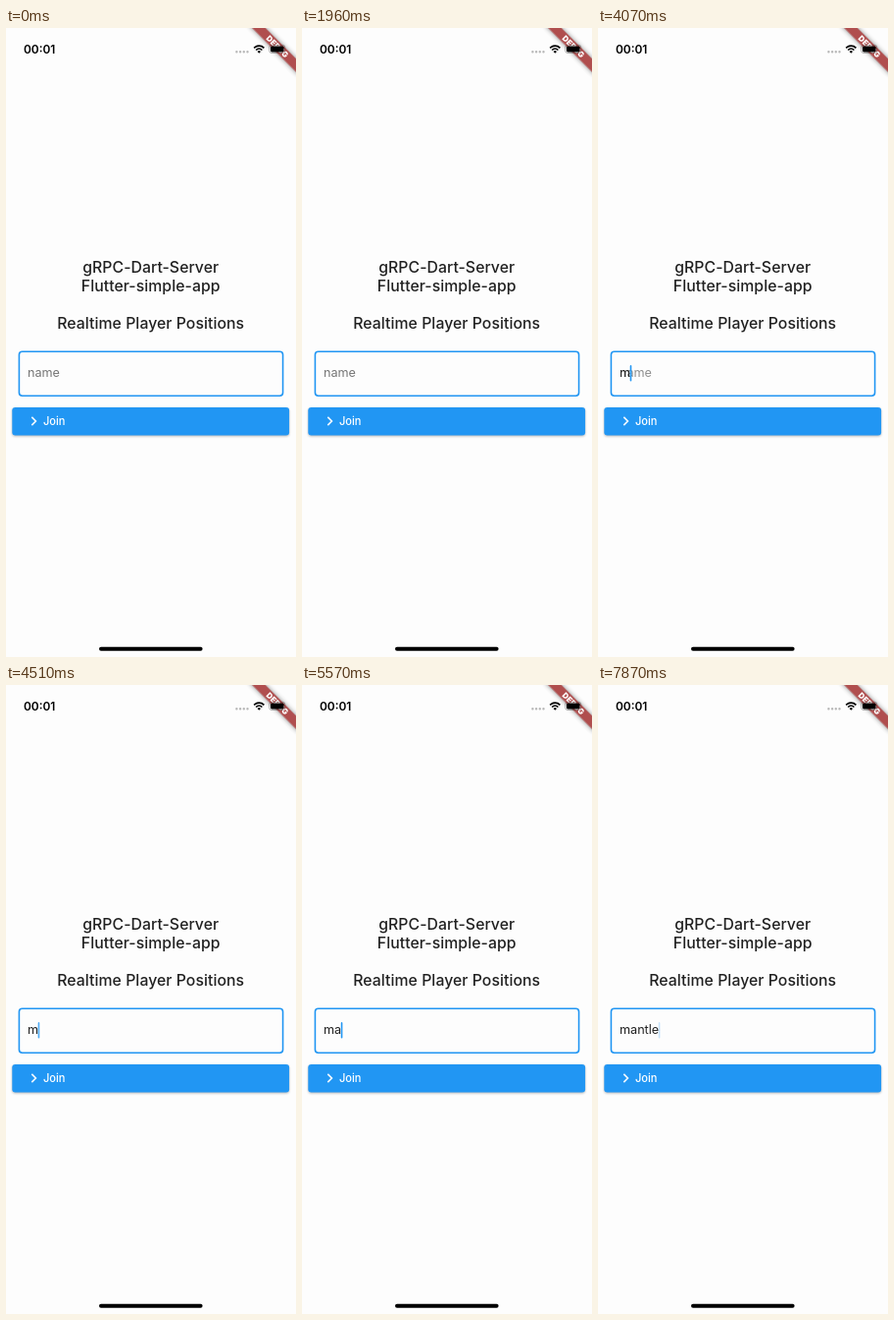
Recreate the animation shown at these times as an HTML page. Size 296 by 640 pixels, loop 7.99 s.

```html
<!DOCTYPE html>
<html lang="en">
<head>
<meta charset="utf-8">
<title>Realtime Player Positions</title>
<style>
  html, body { margin: 0; width: 100%; height: 100%; overflow: hidden; background: #fdfdfd; }
  svg { display: block; width: 100%; height: 100%; }
  text { font-family: Inter, Roboto, sans-serif; }
  .time { font-size: 11.9px; font-weight: 600; }
  .title { font-size: 15.8px; font-weight: 500; letter-spacing: .05px; text-anchor: middle; fill: #212121; }
  .field { font-size: 12.63px; fill: #212121; }
  #hint { fill: #757575; }
  .join { font-size: 11.05px; font-weight: 500; fill: #fff; }
  .debug { font-size: 8.06px; font-weight: 900; fill: #fff; text-anchor: middle; }
  .button { filter: drop-shadow(0 1.1px 1.1px #0004); }
  .ribbon { filter: drop-shadow(0 0 2.4px #0007); }
  .blue { fill: #2196f3; }
</style>
</head>
<body>
<svg viewBox="0 0 296 640">
  <!-- Debug ribbon -->
  <g transform="translate(296 0) rotate(45)">
    <rect class="ribbon" x="-36" y="22.1" width="72" height="9.5" fill="#b04e4e"/>
    <text class="debug" y="29.7">DEBUG</text>
  </g>

  <!-- Status bar -->
  <text class="time" x="18" y="25.7">00:01</text>
  <path d="M235.4 24.3h11.2" stroke="#b8b8b8" stroke-width="2.4" stroke-linecap="round" stroke-dasharray="0 3.7"/>
  <g fill="none" stroke="#000" stroke-width="1.7">
    <path d="M253.2 20.3a7.2 7.2 0 0 1 10.2 0"/>
    <path d="M255.2 22.5a4.4 4.4 0 0 1 6.2 0"/>
  </g>
  <path d="M256.6 23.9a2.4 2.4 0 0 1 3.4 0l-1.7 1.8z"/>
  <rect x="268.8" y="17.3" width="16" height="8.2" rx="2.3" fill="none" stroke="#000" stroke-opacity=".35" stroke-width=".8"/>
  <rect x="270" y="18.5" width="13.6" height="5.9" rx="1.3"/>

  <!-- Heading -->
  <g class="title">
    <text x="147.7" y="249">gRPC-Dart-Server</text>
    <text x="147.7" y="267.8">Flutter-simple-app</text>
    <text x="147.7" y="305.5">Realtime Player Positions</text>
  </g>

  <!-- Name field -->
  <rect x="13.4" y="329.2" width="269.2" height="45" rx="3.2" fill="none" stroke="#2196f3" stroke-width="1.6"/>
  <text id="hint" class="field" x="22" y="355.4">name</text>
  <text id="typed" class="field" x="22" y="355.4"></text>
  <rect id="caret" class="blue" y="343.1" width="1.6" height="16.4" rx=".8"/>

  <!-- Join button -->
  <rect class="button blue" x="6.3" y="386" width="282.8" height="28.4" rx="3.2"/>
  <path d="M26.3 395.9l4.1 4.1-4.1 4.1" fill="none" stroke="#fff" stroke-width="1.6"/>
  <text class="join" x="38" y="403.8">Join</text>

  <!-- Home indicator -->
  <rect x="95" y="629.8" width="105.6" height="4" rx="2"/>
</svg>
<script>
  const LOOP = 7990, NAME = 'mantle', LEFT = 22;
  const keyTimes = [4070, 5370, 5790, 6120, 6120, 6230];
  const FOCUS = -820, BLINK = 1090, FADE = 200, HINT_FADE = 220;

  const [hint, typed, caret] = ['hint', 'typed', 'caret'].map(id => document.getElementById(id));
  const ramp = (t, start, length) => Math.min(1, Math.max(0, (t - start) / length));

  // Each key press restarts the blink with the caret fully lit
  function caretAlpha(t, lastKey) {
    const phase = (t - lastKey) % BLINK;
    return 1 - ramp(phase, 400, FADE) + ramp(phase, 850, FADE);
  }

  function draw(t) {
    const pressed = keyTimes.filter(time => time <= t);
    const text = NAME.slice(0, pressed.length);
    if (typed.textContent !== text) typed.textContent = text;
    const width = text ? typed.getComputedTextLength() : 0;
    caret.setAttribute('x', LEFT - .4 + width);
    caret.setAttribute('opacity', caretAlpha(t, pressed.at(-1) ?? FOCUS));
    hint.setAttribute('opacity', t < keyTimes[0] ? 1 : 1 - ramp(t, keyTimes[0] - 40, HINT_FADE));
  }

  const begin = performance.now();
  function tick() {
    draw((performance.now() - begin) % LOOP);
    requestAnimationFrame(tick);
  }
  tick();
</script>
</body>
</html>
```
